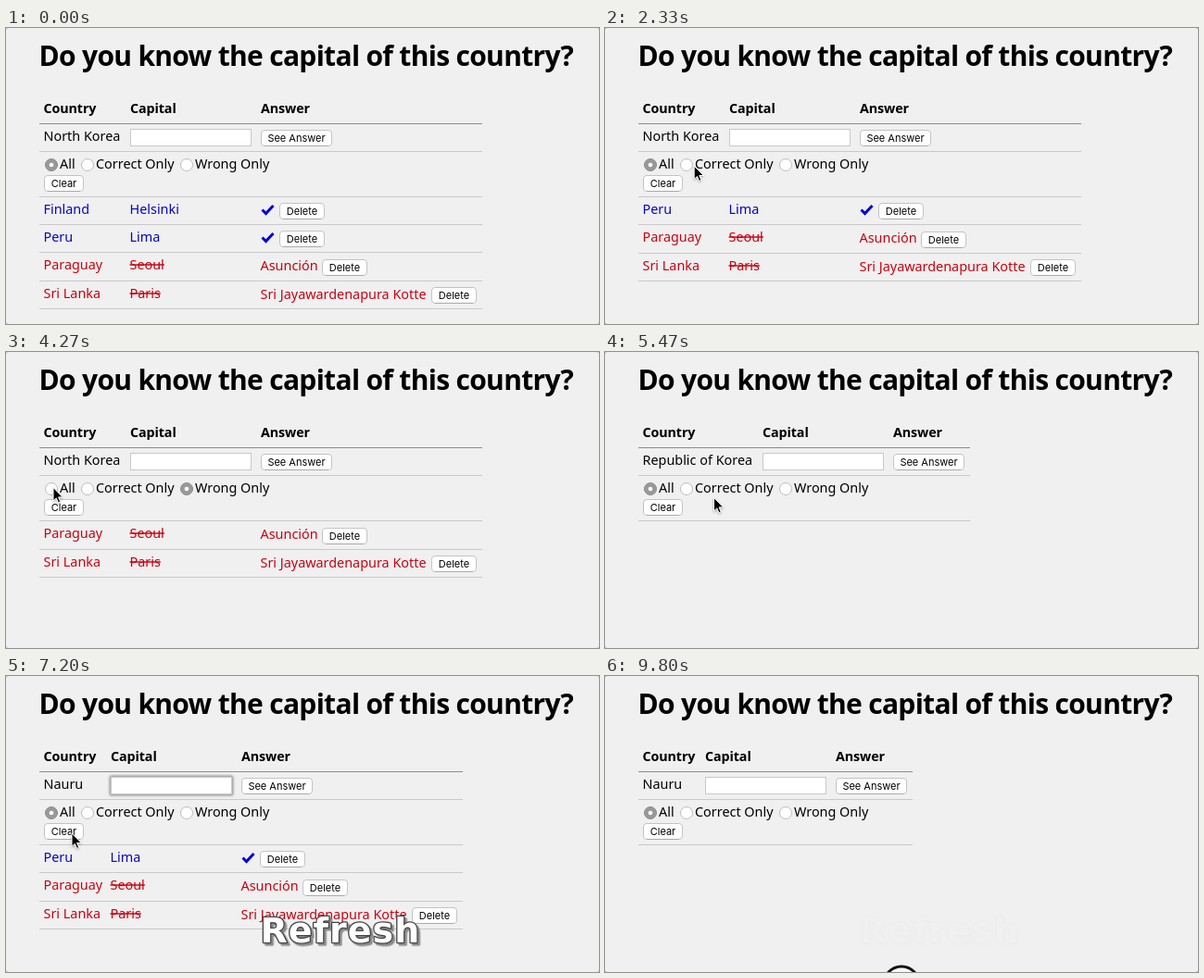
Write an HTML page that moves like this. It is 640 px wide and 320 px high and loops after 9.87 s.

```html
<!DOCTYPE html>
<html lang="en">
<head>
<meta charset="utf-8">
<title>Capital quiz</title>
<style>
html, body { margin: 0; width: 100%; height: 100%; overflow: hidden; background: #f0f0f0; }
svg { display: block; width: 100%; height: 100%; }
text { font: 14.4px "Noto Sans", "Open Sans", sans-serif; fill: #000; white-space: pre; }
.title { font-size: 30px; font-weight: 700; letter-spacing: -.69px; }
.head { font-size: 14.3px; font-weight: 700; letter-spacing: -.1px; }
.label { font: 11px Inter, "Liberation Sans", sans-serif; text-anchor: middle; }
.right { fill: #0606c4; }
.wrong { fill: #ca0010; }
.struck { text-decoration: line-through; }
.caption { font: 700 38px "DejaVu Sans", sans-serif; letter-spacing: 1px; fill: #fff;
  stroke: #444; stroke-width: 2.6px; stroke-linejoin: round; paint-order: stroke; }
</style>
</head>
<body>
<svg viewBox="0 0 640 320" xmlns="http://www.w3.org/2000/svg">
  <defs>
    <linearGradient id="pressed" x2="0" y2="1">
      <stop stop-color="#929292"/><stop offset="1" stop-color="#686868"/>
    </linearGradient>
    <filter id="glow" x="-10%" y="-50%" width="120%" height="200%"><feGaussianBlur stdDeviation=".9"/></filter>
    <filter id="shade" x="-20%" y="-20%" width="150%" height="150%">
      <feDropShadow dx="2.5" dy="2.5" stdDeviation=".5" flood-color="#808080" flood-opacity=".9"/>
    </filter>
    <filter id="soft" x="-30%" y="-30%" width="180%" height="180%">
      <feDropShadow dx="0" dy="1" stdDeviation=".8" flood-opacity=".35"/>
    </filter>
  </defs>
  <rect width="640" height="320" fill="#bbb"/>
  <rect width="640" height="320" rx="3" fill="#f0f0f0"/>
  <text class="title" x="35.5" y="40.5">Do you know the capital of this country?</text>
  <g id="page"></g>
  <g id="caption" filter="url(#shade)"><text class="caption" x="274.5" y="287.5">Refresh</text></g>
  <circle id="ring" cx="320" r="19" fill="#f6f6f6" stroke="#111" stroke-width="3"/>
  <path id="cursor" d="M0 0V14.4L3.3 11.4 5.5 16.4 7.7 15.4 5.6 10.4H10.2Z" fill="#000" stroke="#fff" filter="url(#soft)"/>
</svg>
<script>
const LOOP = 9870, FPS = 15;
const $ = id => document.getElementById(id);

const ROWS = {
  F: { country: 'Finland', guess: 'Helsinki' },
  P: { country: 'Peru', guess: 'Lima' },
  A: { country: 'Paraguay', guess: 'Seoul', answer: 'Asunción', gap: 66 },
  S: { country: 'Sri Lanka', guess: 'Paris', answer: 'Sri Jayawardenapura Kotte', gap: 184 }
};
const COLUMN = { 'North Korea': 134, 'Republic of Korea': 170, Nauru: 108 };

// start, country, rows, selected filter, pressed button, input focused
const STATES = [
  [0, 'North Korea', 'FPAS', 0],
  [1460, 'North Korea', 'FPAS', 0, 'F'],
  [1600, 'North Korea', 'PAS', 0],
  [2530, 'North Korea', 'P', 1],
  [3330, 'North Korea', 'AS', 2],
  [4330, 'North Korea', 'PAS', 0],
  [5400, 'Republic of Korea', '', 0],
  [5600, 'Republic of Korea', 'PAS', 0, '', true],
  [6530, 'Nauru', '', 0],
  [6660, 'Nauru', 'PAS', 0, '', true],
  [7260, 'Nauru', 'PAS', 0, 'clear', true],
  [7400, 'Nauru', '', 0]
];

const CURSOR = [
  [60, 320, 334], [1330, 314, 198.5], [1850, 314, 198.5], [2400, 87, 147], [2650, 87, 147],
  [3100, 198, 148], [3450, 198, 148], [4200, 51, 146.5], [4400, 51, 146.5], [4750, 31, 152],
  [5000, 36, 158], [5460, 117.5, 157.5], [6500, 117.5, 157.5], [7130, 71, 170], [9100, 71, 170], [9720, 320, 336]
];
const CAPTION = [
  [5530, 0], [5800, 1], [7270, 1], [7530, 0], [8330, 0], [8600, 1], [9500, 1], [9820, 0]
];
const RING = [[9600, 345], [9800, 333]];

const text = (s, x, y, cls = '') => `<text class="${cls}" x="${x}" y="${y}">${s}</text>`;
const line = (x, y, color = '#c9c9c9') => `<path d="M36 ${Math.floor(y) + .5}H${x}" stroke="${color}"/>`;

function button(label, x, y, w, pressed) {
  const fill = pressed ? 'url(#pressed)' : '#fff';
  const edge = pressed ? '#666' : '#c3c3c3';
  return `<rect x="${x + .5}" y="${y + .5}" width="${w - 1}" height="17" rx="3.5" fill="${fill}" stroke="${edge}"/>
    <path d="M${x + 4} ${y + 17.5}h${w - 8}" stroke="${pressed ? '#555' : '#aaa'}"/>
    ${text(label, x + w / 2, y + 13, 'label')}`;
}

function radio(x, on) {
  return `<circle cx="${x}" cy="148" r="6.5" fill="${on ? '#999' : '#fff'}" stroke="${on ? '#8b8b8b' : '#bcbcbc'}"/>` +
    (on ? `<circle cx="${x}" cy="148" r="2.3" fill="#fff"/>` : '');
}

function input(x, focused) {
  const glow = focused
    ? `<rect x="${x}" y="109" width="131" height="19" rx="1" fill="none" stroke="#999" stroke-width="3" filter="url(#glow)"/>` : '';
  return `${glow}<rect x="${x + .5}" y="109.5" width="130" height="18" fill="#fff" stroke="#c8c8c8"/>`;
}

function row(key, y, x2, x3, pressed) {
  const { country, guess, answer, gap = 20 } = ROWS[key];
  const cls = answer ? 'wrong' : 'right';
  const base = Math.floor(y) + 19;
  const mark = answer
    ? text(answer, x3 - .5, base + .5, cls)
    : `<path d="M${x3 + 1.5} ${base - 4.5}l4 4 8-8.5" fill="none" stroke="#0000e0" stroke-width="3"/>`;
  return text(country, 40.5, base, cls) + text(guess, x2 - .5, base, cls + (answer ? ' struck' : '')) + mark +
    button('Delete', x3 + gap, Math.ceil(y) + (answer ? 7 : 6), 49, pressed);
}

function page([, country, keys, filter, pressed, focused]) {
  const x2 = Math.max(COLUMN[country], keys.includes('A') ? 113 : 0);
  const x3 = x2 + 141;
  const end = x3 + (keys.includes('S') ? 239 : 83);
  let out = text('Country', 40.5, 92, 'head') + text('Capital', x2, 92, 'head') + text('Answer', x3, 92, 'head') +
    line(end, 103, '#8c8c8c') + text(country, 40.5, 122) + input(x2, focused) +
    button('See Answer', x3, 110, 77) + line(end, 133);
  [[49, 'All'], [88, 'Correct Only'], [195, 'Wrong Only']].forEach(([x, label], i) => {
    out += radio(x, i === filter) + text(label, x + 9, 152);
  });
  out += button('Clear', 41, 159, 43, pressed === 'clear') + line(end, 182);
  let y = 182.5;
  for (const key of keys) {
    out += row(key, y, x2, x3, pressed === key);
    y += ROWS[key].answer ? 30.5 : 30;
    out += line(end, y);
  }
  return out;
}

// Eased values between the steps of a [time, ...values] table
function at(steps, t) {
  const i = steps.findIndex(s => s[0] > t);
  if (i === 0) return steps[0].slice(1);
  if (i < 0) return steps[steps.length - 1].slice(1);
  const a = steps[i - 1], b = steps[i];
  const u = (t - a[0]) / (b[0] - a[0]), k = u * u * (3 - 2 * u);
  return a.slice(1).map((v, j) => v + (b[j + 1] - v) * k);
}

let shown;
function draw(now) {
  const tick = Math.floor((now % LOOP + 3.4) * FPS / 1000);
  const t = Math.min(tick, 147) * 1000 / FPS;
  const state = STATES.filter(s => s[0] <= t).pop();
  if (state !== shown) {
    $('page').innerHTML = page(state);
    shown = state;
  }
  const [x, y] = at(CURSOR, t);
  $('cursor').setAttribute('transform', `translate(${x} ${y})`);
  $('caption').setAttribute('opacity', at(CAPTION, t)[0]);
  $('ring').setAttribute('cy', at(RING, t)[0]);
}

const start = performance.now();
function loop() {
  draw(performance.now() - start);
  requestAnimationFrame(loop);
}
loop();
</script>
</body>
</html>
```
